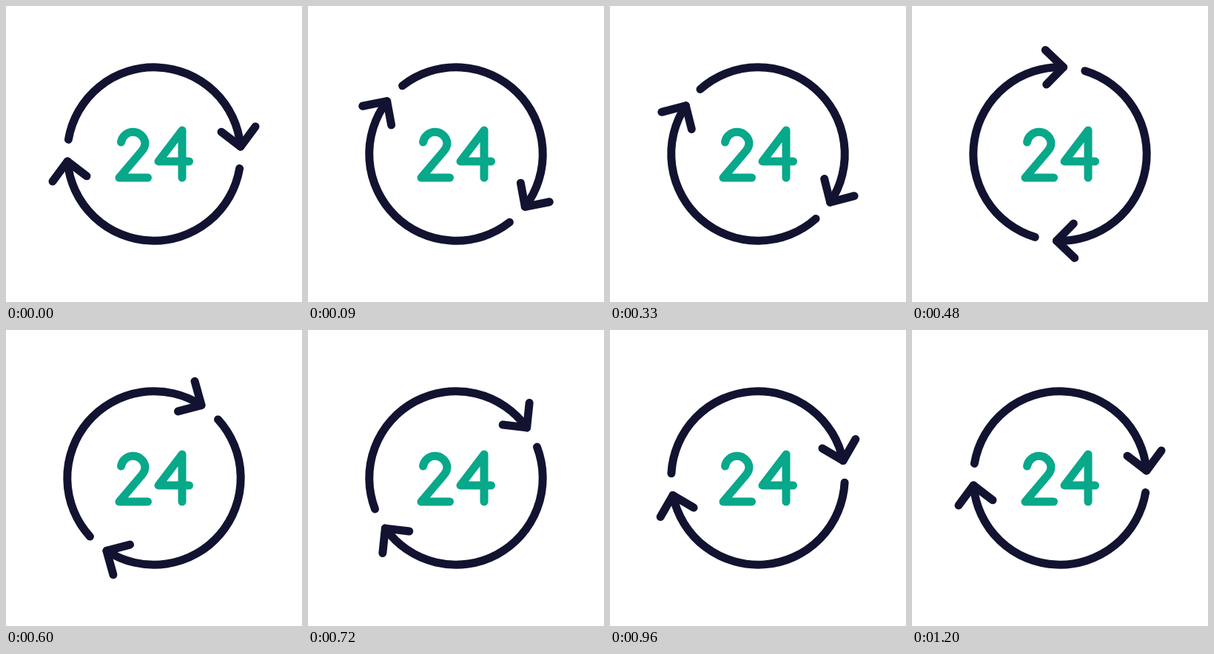
An HTML page that plays this animation: 400x400 px, repeating every 3.23 s.

```html
<!DOCTYPE html>
<html lang="en">
<head>
<meta charset="utf-8">
<title>Around the clock</title>
<style>
  html, body {
    margin: 0;
    width: 100%;
    height: 100%;
    overflow: hidden;
    background: #fff;
  }
  svg {
    display: block;
    width: 100%;
    height: 100%;
    fill: none;
    stroke-width: 11;
    stroke-linecap: round;
    stroke-linejoin: round;
  }
  #ring { stroke: #121331; }
  #digits { stroke: #08a88a; }
</style>
</head>
<body>
<svg viewBox="0 0 400 400">
  <defs>
    <g id="arrow">
      <path d="M-115.6 -19.6A117.3 117.3 0 0 1 116.9 -10"/>
      <path d="M91 -29.8L117 -10L137 -37"/>
    </g>
  </defs>
  <g id="ring" transform="translate(200 200)">
    <use href="#arrow"/>
    <use href="#arrow" transform="rotate(180)"/>
  </g>
  <g id="digits">
    <path d="M155.5 184A16.4 16.4 0 0 1 188 185C188 189 186.5 192.5 183.5 196L153 232H191.5"/>
    <path d="M238 232V168L206 210H247.5"/>
  </g>
</svg>
<script>
  const LOOP = 3230, TURN = 1200, STEP = 30;
  const ring = document.getElementById('ring');

  const bezier = (a, b, u) =>
    3 * u * (1 - u) ** 2 * a + 3 * u * u * (1 - u) * b + u ** 3;

  // Quick start, long settle: cubic-bezier(.15, .05, .12, 1)
  function ease(x) {
    if (x <= 0 || x >= 1) return x <= 0 ? 0 : 1;
    let lo = 0, hi = 1;
    for (let i = 0; i < 30; i++) {
      const mid = (lo + hi) / 2;
      if (bezier(.15, .12, mid) < x) lo = mid; else hi = mid;
    }
    return bezier(.05, 1, lo);
  }

  function draw(ms) {
    // The turn advances in 30 ms steps; 1 ms of slack absorbs clock rounding.
    const t = Math.floor((ms % LOOP + 1) / STEP) * STEP;
    const angle = 360 * ease(t / TURN);
    ring.setAttribute('transform', `translate(200 200) rotate(${angle.toFixed(3)})`);
  }

  const start = performance.now();
  function tick(now) {
    draw(Math.max(0, now - start));
    requestAnimationFrame(tick);
  }
  draw(0);
  requestAnimationFrame(tick);
</script>
</body>
</html>
```
